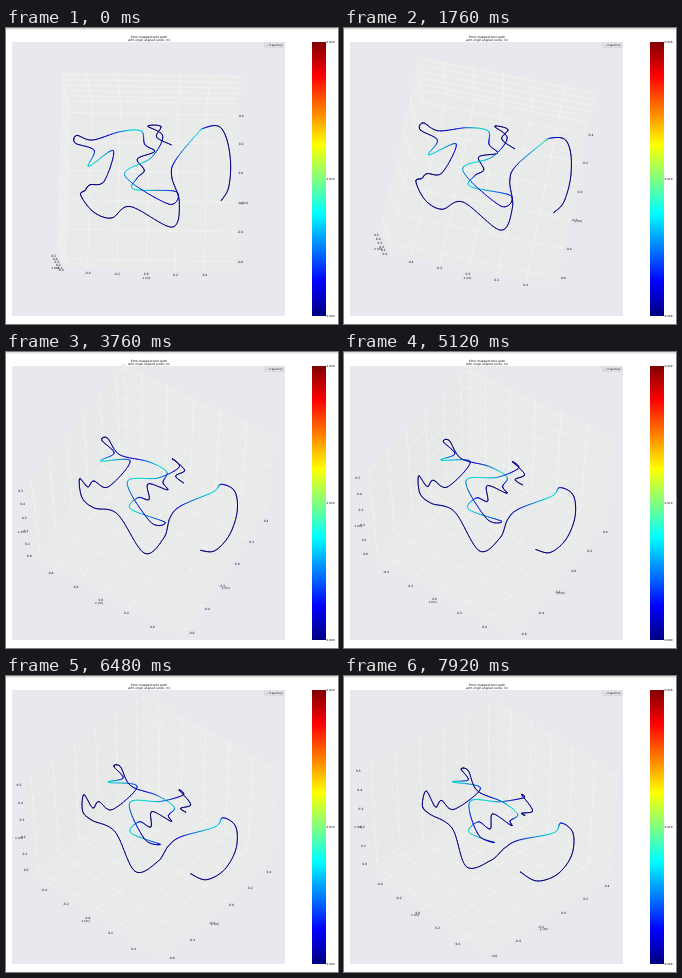
Recreate the animation shown at these times as an HTML page with a canvas. Size 332 by 296 pixels, loop 8 s.

```html
<!DOCTYPE html>
<html lang="en">
<head>
<meta charset="utf-8">
<title>Rotating 3D trajectory</title>
<style>
html, body { margin: 0; width: 100%; height: 100%; overflow: hidden; background: #fff; }
canvas { display: block; }
</style>
</head>
<body>
<canvas id="stage" width="332" height="296"></canvas>
<script>
const ctx = document.getElementById('stage').getContext('2d');
const LOOP = 8000, STEP = 80;
const CENTER = { x: 146, y: 147 }, DISTANCE = 1476;
const H = 87.8, HZ = 65.9; // half sizes of the plot box
const RAD = Math.PI / 180;

const repeat = (count, rule) => Array.from({ length: count }, (_, i) => rule(i));

// time in ms, rotation and elevation in degrees
const CAMERA = [[0, 1, 80], [1760, 11.5, 78], [3760, 31, 56], [5120, 34, 50], [7920, 48, 38]];

const arc = i => {
  const a = (41 * i - 75) * RAD;
  return [66 + 14 * Math.cos(a), 13 + 38 * Math.sin(a), -27 * Math.cos(a)];
};
const zigzag = i => [i % 2 ? -15 : 2 - 5 * i, 27 - 9.8 * i, i % 2 ? -6 : -16];

// key points of the trajectory: x, y, z
const PATH = [
  ...repeat(5, arc),
  [52, 48, 5], [45, 45, -10], [23, 18, -18], [20, 2, -21], [28, -24, -18], [21, -50, -16],
  [-21, -32, -2], [-39, -46, 13], [-57, -40, 10], [-70, -24, 13],
  [-67, -15, -10], [-62, -11, -1], [-48, -6, -7], [-39, 22, 11],
  [-63, 5, 14], [-58, 22, 11], [-77, 29, 11], [-76, 38, 5], [-61, 37, -12],
  [-33, 47, -16], [-12, 49, -21], [-8, 35, -20],
  ...repeat(5, zigzag),
  [24, -16, -2], [17, -31, 12], [-27, -3, 13], [-1, 14, 19], [10, 36, 19],
  [-5, 48, 8], [8, 51, -6], [4, 40, -6], [19, 30, 5]
];
const PEAKS = [6, 19, 24.7, 31, 34.5]; // where along the path the value is high

const X_TICKS = repeat(5, i => 30.3 * i - 65);
const Y_TICKS = repeat(6, i => 31 * i - 78);
const Z_TICKS = repeat(6, i => 23.6 * i - 59);

function jet(v, shade = 1) {
  const channel = c => Math.round(255 * shade * Math.max(0, Math.min(1, 1.5 - Math.abs(4 * v - c))));
  return `rgb(${channel(3)},${channel(2)},${channel(1)})`;
}

// Catmull-Rom through the key points
function spline(position) {
  const last = PATH.length - 1;
  const i = Math.min(Math.floor(position), last - 1), f = position - i;
  const [a, b, c, d] = [-1, 0, 1, 2].map(k => PATH[Math.max(0, Math.min(last, i + k))]);
  return b.map((p, k) => p + f / 2 * (c[k] - a[k]
    + f * (2 * a[k] - 5 * p + 4 * c[k] - d[k] + f * (3 * (p - c[k]) + d[k] - a[k]))));
}

const SUB = 12;
const curve = repeat((PATH.length - 1) * SUB + 1, i => {
  const s = i / SUB;
  const value = PEAKS.reduce((sum, peak) => sum + .36 * Math.exp(-((s - peak) ** 2)), .02);
  return { point: spline(s), color: jet(value, .85) };
});

function projection(time) {
  const i = CAMERA.findLastIndex((key, k) => k < CAMERA.length - 1 && time >= key[0]);
  const from = CAMERA[i], to = CAMERA[i + 1];
  const f = (time - from[0]) / (to[0] - from[0]);
  const [turn, tilt] = [1, 2].map(k => (from[k] + (to[k] - from[k]) * f) * RAD);
  const ct = Math.cos(turn), st = Math.sin(turn), ce = Math.cos(tilt), se = Math.sin(tilt);
  return ([x, y, z]) => {
    const away = y * ct - x * st;
    const scale = DISTANCE / (DISTANCE + away * ce - z * se);
    return [CENTER.x + (x * ct + y * st) * scale, CENTER.y - (away * se + z * ce) * scale];
  };
}

function trace(points) {
  ctx.beginPath();
  points.forEach(p => ctx.lineTo(...p));
}

function text(string, x, y, size = 3, align = 'center') {
  ctx.font = `${size}px "DejaVu Sans", sans-serif`;
  ctx.textAlign = align;
  ctx.textBaseline = 'middle';
  ctx.fillStyle = '#000';
  ctx.fillText(string, x, y);
}

function drawFrame() {
  ctx.fillStyle = '#fff';
  ctx.fillRect(0, 0, 332, 296);
  ctx.fillStyle = '#dcdcd4';
  ctx.fillRect(0, 0, 332, 1.5);
  ctx.fillStyle = '#e8e8ef';
  ctx.fillRect(6, 14, 273, 274);

  const gradient = ctx.createLinearGradient(0, 288, 0, 14);
  repeat(17, i => gradient.addColorStop(i / 16, jet(i / 16)));
  ctx.fillStyle = gradient;
  ctx.fillRect(306, 14, 14, 274);
  ['0.020', '0.010', '0.000'].forEach((label, i) => text(label, 320.5, 14.5 + 137 * i, 2.8, 'left'));
}

function drawBox(project) {
  const panes = [
    ['#e6e9e8', [[-H, -H, -HZ], [-H, H, -HZ], [-H, H, HZ], [-H, -H, HZ]]],
    ['#e9ebea', [[-H, H, -HZ], [H, H, -HZ], [H, H, HZ], [-H, H, HZ]]],
    ['#e9ebea', [[-H, -H, -HZ], [H, -H, -HZ], [H, H, -HZ], [-H, H, -HZ]]]
  ];
  for (const [color, corners] of panes) {
    trace(corners.map(project));
    ctx.fillStyle = color;
    ctx.fill();
  }
  const grid = [
    ...X_TICKS.map(x => [[x, -H, -HZ], [x, H, -HZ], [x, H, HZ]]),
    ...Y_TICKS.map(y => [[H, y, -HZ], [-H, y, -HZ], [-H, y, HZ]]),
    ...Z_TICKS.map(z => [[-H, -H, z], [-H, H, z], [H, H, z]])
  ];
  ctx.strokeStyle = '#f6f7f7';
  ctx.lineWidth = .5;
  for (const line of grid) {
    trace(line.map(project));
    ctx.stroke();
  }
}

function drawLabels(project) {
  const put = (label, point) => text(label, ...project(point));
  X_TICKS.forEach((x, i) => put((i * .2 - .4).toFixed(1), [x, -H - 5, -HZ - 2]));
  Y_TICKS.forEach((y, i) => put((i * .2 - .6).toFixed(1), [H + 5, y, -HZ - 2]));
  Z_TICKS.forEach((z, i) => put((i * .1).toFixed(1), [-H - 4, -H - 3, z]));
  put('x (m)', [-4, -H - 9, -HZ - 2]);
  put('y (m)', [H + 9, -16, -HZ - 2]);
  put('z (m)', [-H - 7, -H - 6, -12]);
}

function drawCurve(project) {
  const points = curve.map(c => project(c.point));
  ctx.lineWidth = 1;
  ctx.lineCap = 'round';
  for (let i = 1; i < points.length; i++) {
    trace([points[i - 1], points[i]]);
    ctx.strokeStyle = curve[i].color;
    ctx.stroke();
  }
}

function drawCaptions() {
  text('Error mapped onto path', 143, 8.8);
  text('with origin aligned (units: m)', 143, 12.4, 2.9);
  ctx.fillStyle = '#e4e4ea';
  ctx.fillRect(258.5, 15, 19.5, 4.5);
  ctx.strokeStyle = '#c4c4cc';
  ctx.lineWidth = .4;
  ctx.strokeRect(258.5, 15, 19.5, 4.5);
  text('— trajectory', 268.3, 17.3, 2.7);
}

function render(now) {
  const project = projection(Math.floor((now % LOOP) / STEP) * STEP);
  drawFrame();
  drawBox(project);
  drawLabels(project);
  drawCurve(project);
  drawCaptions();
  requestAnimationFrame(render);
}
render(performance.now());
</script>
</body>
</html>
```
